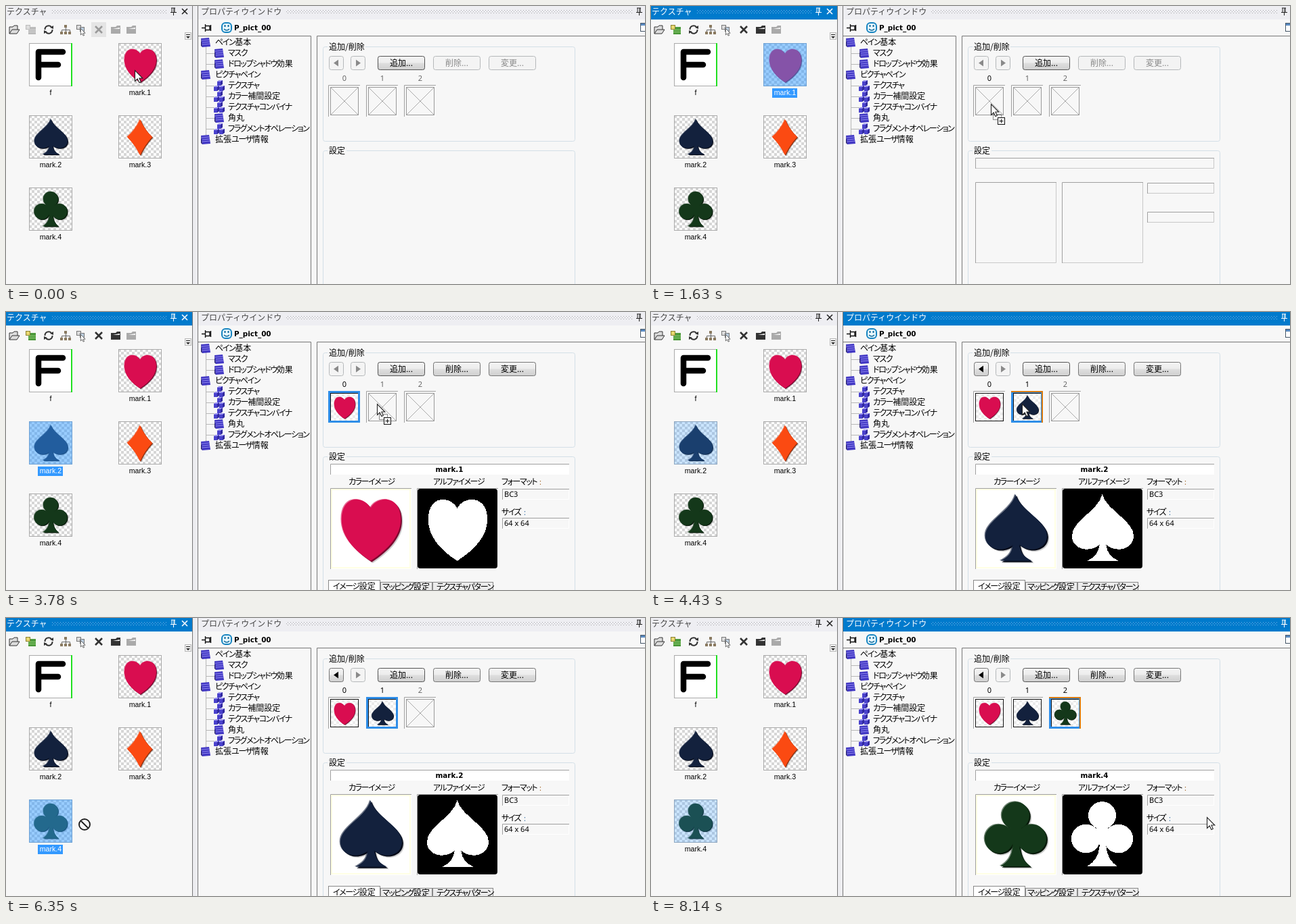
Recreate the animation shown at these times as an HTML page. Size 944 px wide and 412 px high, loop 8.21 s.

```html
<!DOCTYPE html>
<html lang="ja">
<head>
<meta charset="utf-8">
<title>Texture drag and drop</title>
<style>
  html, body { margin: 0; width: 100%; height: 100%; overflow: hidden; background: #f7f7f7; }
  svg { display: block; }
  text { font: 12px "Noto Sans CJK JP", "Noto Sans CJK", "Noto Sans", sans-serif; white-space: pre; }
  .kana { font-feature-settings: "palt"; letter-spacing: -1.4px; }
  .name { font: 10.6px "Liberation Sans", Arial, sans-serif; }
  .num { font: 11px "Noto Sans", sans-serif; }
  .bold { font: bold 10.4px "DejaVu Sans", sans-serif; }
  .mid { text-anchor: middle; }
</style>
</head>
<body>
<svg width="944" height="412" viewBox="0 0 944 412">
  <defs>
    <pattern id="checker" width="8" height="8" patternUnits="userSpaceOnUse">
      <path d="M0 0h8v8h-8z" fill="#fff"/><path d="M0 0h4v4H0zM4 4h4v4H4z" fill="#d6d6d6"/>
    </pattern>
    <pattern id="gripOff" width="4" height="4" y="6" patternUnits="userSpaceOnUse">
      <path d="M0 0h1v1H0zM2 2h1v1H2z" fill="#a9a9ad"/>
    </pattern>
    <pattern id="gripOn" width="4" height="4" y="6" patternUnits="userSpaceOnUse">
      <path d="M0 0h1v1H0zM2 2h1v1H2z" fill="#6cb8e8"/>
    </pattern>
    <linearGradient id="face" x2="0" y2="1">
      <stop offset="0" stop-color="#f4f4f4"/><stop offset=".48" stop-color="#ececec"/>
      <stop offset=".52" stop-color="#dedede"/><stop offset="1" stop-color="#d0d0d0"/>
    </linearGradient>
    <g id="book">
      <path d="M-7-6L5-7L7 6L-5 7z" fill="#4238c4"/><path d="M-7-6L-5 7L-7 5z" fill="#1d1670"/>
      <path d="M-6-3L5-4M-5 0L6-1M-5 3L6 2" stroke="#8f88ee"/>
    </g>
    <g id="cube">
      <path d="M-4-2L-1-4H4V2L1 4H-4z" fill="#3028a0"/><path d="M-4-2L-1-4H4L1-2z" fill="#9b94f2"/>
      <path d="M-4-2H1V4H-4z" fill="#4a42cc"/>
    </g>
    <g id="cubes"><use href="#cube" x="1" y="-4"/><use href="#cube" x="-4" y="4"/><use href="#cube" x="4" y="4"/></g>
    <g id="folder"><path d="M-7 6V-4H-2L0-6H5V0"/><path d="M-7 6L-3 0H8L4 6z"/></g>
    <g id="closed"><path d="M-7 6V-4H0L2-6H7V6z" stroke="none"/><path d="M-4-1L6-3V-1z" fill="#f7f7f7" stroke="none"/></g>
    <path id="pin" d="M-3-5H3M-2-5V1M1-5V1M2-5V1M-4 1.500H5M.5 2V6"/>
    <path id="arrow" d="M.5.5V16.500L4.200 13L6.800 18.500L9.300 17.400L6.900 12H11.800z" fill="#fff" stroke="#222" stroke-width="1.100"/>
  </defs>
  <g id="stage"></g>
</svg>
<script>
const LOOP = 8210, STEP = 70;
const BLUE = '#007acc', SELECT = '#3399ff', EDGE = '#a0a0a0', BACK = '#f7f7f7';

// Suit colour, shade and outline in a 64-unit square.
const suits = {
  heart: ['#d90d50', '#7c0830', 'M32 16C27 6 9 5 9 25C9 38 18 49 32 58C46 49 56 38 56 25C56 5 37 6 32 16z'],
  spade: ['#13213d', '#050a18', 'M32 5C36 18 57 26 57 38C57 49 43 52 35 45C36 52 39 55 45 58H20C26 55 29 52 30 45C22 52 8 49 8 38C8 26 29 18 32 5z'],
  diamond: ['#fb4a12', '#93310f', 'M32 6Q39 22 50 32Q39 44 32 59Q25 44 13 32Q25 22 32 6z'],
  club: ['#14381a', '#061808', 'M32 6a11 11 0 1 1 0 22a11 11 0 1 1 0-22M19 24a11.500 11.500 0 1 1 0 23a11.500 11.500 0 1 1 0-23M45 24a11.500 11.500 0 1 1 0 23a11.500 11.500 0 1 1 0-23M27 25H37L35 41C36 50 39 54 44 57.500H20C26 54 29 50 30 41z']
};

const textures = [
  { x: 34, y: 55, name: 'f' },
  { x: 166, y: 55, name: 'mark.1', suit: 'heart' },
  { x: 34, y: 162, name: 'mark.2', suit: 'spade' },
  { x: 166, y: 162, name: 'mark.3', suit: 'diamond' },
  { x: 34, y: 269, name: 'mark.4', suit: 'club' }
];

const drags = [
  { press: 520, lift: 750, drop: 1700, item: textures[1] },
  { press: 2770, lift: 3080, drop: 4010, item: textures[2] },
  { press: 6050, lift: 6280, drop: 7380, item: textures[4] }
];
const FORM_SHOWN = 1630;

// Pointer path: start, end, then a quadratic curve.
const moves = [
  [70, 140, [190, 95], [186, 95], [182, 95]],
  [750, 1170, [182, 95], [360, 145], [502, 145]],
  [1700, 2330, [502, 145], [300, 178], [107, 159]],
  [2480, 2620, [107, 159], [96, 170], [85, 181]],
  [3080, 3780, [85, 181], [330, 175], [548, 136]],
  [5120, 5820, [549, 136], [315, 290], [70, 306]],
  [6280, 7070, [70, 306], [380, 310], [624, 145]],
  [8000, 8140, [624, 145], [710, 192], [821, 295]]
];

const tree = [
  [0, 'book', 'ペイン基本'], [1, 'book', 'マスク'], [1, 'book', 'ドロップシャドウ効果'],
  [0, 'book', 'ピクチャペイン'], [1, 'cubes', 'テクスチャ'], [1, 'cubes', 'カラー補間設定'],
  [1, 'cubes', 'テクスチャコンバイナ'], [1, 'book', '角丸'], [1, 'cubes', 'フラグメントオペレーション'],
  [0, 'book', '拡張ユーザ情報']
];

const clamp = v => Math.max(0, Math.min(1, v));
const rect = (x, y, w, h, fill, extra = '') => `<rect x="${x}" y="${y}" width="${w}" height="${h}" fill="${fill}" ${extra}/>`;
const box = (x, y, w, h, fill, stroke, extra = '') =>
  rect(x + .5, y + .5, w - 1, h - 1, fill, `stroke="${stroke}" ${extra}`);
const line = (d, stroke, width = 1, extra = '') =>
  `<path d="${d}" fill="none" stroke="${stroke}" stroke-width="${width}" ${extra}/>`;
const use = (id, x, y, extra = '') => `<use href="#${id}" x="${x}" y="${y}" ${extra}/>`;
const at = (x, y, content) => `<g transform="translate(${x} ${y})">${content}</g>`;
const plain = (x, y, s, cls = '', fill = '#000') => `<text x="${x}" y="${y}" class="${cls}" fill="${fill}">${s}</text>`;
const ui = (x, y, s) => plain(x, y, s.replace(/[ァ-ヶー]+/g, '<tspan class="kana">$&</tspan>'));
const sunken = (x, y, w, h, light = '#fff') =>
  line(`M${x} ${y + h - .5}H${x + w - .5}V${y}`, light) + line(`M${x + .5} ${y + h}V${y + .5}H${x + w}`, EDGE);

function suit(name, x, y, size) {
  const [color, shade, d] = suits[name];
  return `<g transform="translate(${x} ${y}) scale(${size / 64})">
    <path d="${d}" fill="#000" opacity=".2" transform="translate(1.800 1.800)"/>
    <path d="${d}" fill="${shade}" transform="translate(1 1)"/>
    <path d="${d}" fill="${color}" opacity=".6" transform="translate(-.7 -.5)"/><path d="${d}" fill="${color}"/></g>`;
}

function titleBar(x, w, title, gripX, gripEnd, active) {
  const ink = active ? '#fff' : '#222';
  return rect(x, 0, w, 20, active ? BLUE : '#eeeef2') + plain(x + (x ? 4 : 1), 13, title, '', active ? '#fff' : '#444') +
    rect(gripX, 6, gripEnd - gripX, 5, `url(#grip${active ? 'On' : 'Off'})`) +
    use('pin', gripEnd + 10, 8, `fill="none" stroke="${ink}"`);
}

function toolbar(on) {
  const dark = '#333', faint = '#aaa';
  return use('folder', 12, 35, `stroke="${dark}" fill="#ddd"`) +
    rect(33, 31, 11, 11, on ? '#4d9a3c' : '#bcbcbc') + line('M33 35.500H44M33 38.500H44', on ? '#8ccc70' : '#d4d4d4') +
    box(29, 28, 7, 7, on ? '#e8d870' : '#ddd', on ? '#8a8030' : '#bbb') +
    line('M57.500 35A5.500 5.500 0 0 1 67 31M68.500 35A5.500 5.500 0 0 1 59 39', dark, 2) +
    `<path d="M65 32L70 29V34zM61 38L56 41V36z" fill="${dark}"/>` +
    line('M88.500 31V35M82.500 38V35.500H94.500V38M88.500 35V38', '#666') +
    [[86, 28], [80, 38], [86, 38], [92, 38]].map(p => rect(...p, 4, 4, '#8a7a60')).join('') +
    box(104, 28, 7, 7, '#ddd', '#777') + box(109, 31, 7, 7, '#bcd', '#777') +
    use('arrow', 0, 0, 'transform="translate(110 33) scale(.6)"') +
    (on ? '' : rect(126, 24, 22, 22, '#e5e5e5')) +
    line('M132 30L142 40M142 30L132 40', on ? dark : '#9a9a9a', 2.6) +
    use('closed', 162, 35, `fill="${on ? dark : faint}"`) + use('closed', 185, 35, `fill="${faint}"`) +
    box(264, 39, 10, 11, '#eee', '#bbb') + line('M266 42.500H272', '#222') + '<path d="M266 45h6l-3 3z" fill="#222"/>';
}

function tile(item, strength, focused) {
  const picture = item.suit ? suit(item.suit, 0, 0, 64) :
    line('M50 13H14V51M14 32H43', '#000', 8.5, 'stroke-linecap="round" stroke-linejoin="round"') +
    rect(62, 0, 2, 64, '#20e020');
  return at(item.x, item.y, box(0, 0, 64, 64, item.suit ? 'url(#checker)' : '#fff', '#aaa') + picture +
    (strength ? rect(0, 0, 64, 64, SELECT, `opacity="${strength}"`) : '') +
    (focused ? rect(13, 67, 37, 14, SELECT) : '') +
    plain(32, 77, item.name, 'name mid', focused ? '#fff' : '#000'));
}

function button(x, w, content, enabled, isDefault) {
  const face = (on, opacity) => `<g opacity="${opacity}" fill="${on ? '#000' : '#8a8a8a'}">` +
    box(x, 74, w, 21, on ? 'url(#face)' : '#f4f4f4', on ? (isDefault ? '#555' : '#777') : '#b5b8ba', 'rx="3"') +
    content + '</g>';
  return face(false, 1) + (enabled ? face(true, enabled) : '');
}
const textButton = (x, caption, enabled, isDefault) =>
  button(x, 70, `<text x="${x + 35}" y="89" class="mid">${caption}</text>`, enabled, isDefault);
const arrowButton = (x, way, enabled) =>
  button(x, 22, `<path d="M${x + 11 + 4 * way} 84.500l${-7 * way}-5v10z"/>`, enabled);

function slot(i, item, selected, hot, lit) {
  const frame = sunken(0, 0, 47, 47);
  let content = frame + box(3, 3, 42, 42, BACK, '#999') + line('M3 3l42 42m0-42l-42 42', '#aaa');
  if (item) {
    content = frame + box(3, 3, 42, 42, '#fff', '#111') + rect(4, 4, 40, 40, 'url(#checker)', 'opacity=".5"') +
      suit(item.suit, 3, 3, 42);
    if (selected) content += line('M1.500 1.500h44v44h-44z', '#2f8ee8', 3);
    if (selected && hot) content += line('M0 1h46v46', '#d87a10', 2);
  }
  return at(476 + 56 * i, 117, content + plain(24, -6, i, 'num mid', lit ? '#000' : '#666'));
}

function settings(item) {
  const field = (x, y, w, h) => sunken(x, y, w, h, item ? '#fff' : '#c8c8c8');
  const fields = field(479, 225, 353, 16) + field(479, 261, 120, 120) + field(607, 261, 120, 120) +
    field(733, 262, 99, 16) + field(733, 305, 99, 16);
  if (!item) return fields;
  return rect(479, 225, 353, 16, '#fff') + rect(479, 261, 120, 120, '#ffffe4') + fields +
    plain(655, 237, item.name, 'bold mid') +
    ui(506, 256, 'カラーイメージ') + ui(631, 256, 'アルファイメージ') +
    ui(732, 256, 'フォーマット') + plain(788, 256, ':', 'num', '#a06020') +
    ui(732, 301, 'サイズ') + plain(765, 301, ':', 'num', '#306aa0') +
    rect(482, 264, 114, 114, '#fff') + suit(item.suit, 479, 261, 119) +
    rect(608, 262, 118, 118, '#000', 'rx="4"') +
    `<path d="${suits[item.suit][2]}" fill="#fff" shape-rendering="crispEdges" transform="translate(607 261) scale(1.860)"/>` +
    plain(736, 274, 'BC3', 'num') + plain(736, 317, '64 x 64', 'num') +
    box(553, 400, 77, 14, '#ececec', '#888') + box(630, 400, 90, 14, '#ececec', '#888') +
    box(476, 397, 77, 18, '#fff', '#888') +
    ui(483, 411, 'イメージ設定') + ui(556, 412, 'マッピング設定') + ui(636, 412, 'テクスチャパターン');
}

const group = (y, h, title, w) =>
  box(468, y, 373, h, 'none', '#d3dfe7', 'rx="3"') + rect(475, y - 2, w, 5, BACK) + ui(477, y + 5, title);

function pointerAt(t) {
  let spot = moves[0][2];
  for (const [start, end, a, b, c] of moves) {
    if (t < start) break;
    const steps = Math.round((end - start) / STEP) + 1;
    const k = clamp((Math.floor((t - start) / STEP) + 1) / steps), e = k * k * (3 - 2 * k);
    spot = a.map((v, i) => Math.round((1 - e) ** 2 * v + 2 * e * (1 - e) * b[i] + e * e * c[i]));
  }
  return spot;
}

function pointer(t) {
  const [x, y] = pointerAt(t);
  const dragging = drags.some(d => t >= d.lift && t < d.drop);
  const overSlot = x > 475 && x < 636 && y > 116 && y < 166;
  const ring = 'M-8 0A8 8 0 1 1 8 0A8 8 0 1 1-8 0M-5.500-5.500L5.500 5.500';
  if (dragging && !overSlot) return at(x, y, line(ring, '#fff', 4) + line(ring, '#222', 2));
  const badge = box(3, 15, 13, 9, 'none', '#222', 'stroke-dasharray="1 1"') + use('arrow', 0, 0) +
    box(10, 20, 11, 11, '#fff', '#111') + line('M12.500 25.500H18.500M15.500 22.500V28.500', '#111');
  return at(x, y, dragging ? badge : use('arrow', 0, 0));
}

function leftPanel(current, active) {
  return titleBar(0, 275, 'テクスチャ', 68, 237, active) +
    line('M260 4L268 12M268 4L260 12', active ? '#fff' : '#222', 1.6) + toolbar(!!current) +
    textures.map(item => {
      const chosen = current && current.item === item;
      return tile(item, chosen ? (active ? .5 : .25) : 0, chosen && active);
    }).join('');
}

function treePanel() {
  const branches = tree.map(([depth], i) => depth ? `M295.500 ${54.5 + 16 * i}H308` : '').join('');
  return line('M295.500 60V198' + branches, '#777', 1, 'stroke-dasharray="1 1"') +
    tree.map(([depth, icon, caption], i) =>
      use(icon, 295 + 20 * depth, 54 + 16 * i) + ui(309 + 19 * depth, 58 + 16 * i, caption)).join('');
}

function rightPanel(t, active) {
  const dropped = drags.filter(d => t >= d.drop).map(d => d.item);
  const last = dropped.length - 1;
  const fade = i => clamp((t - drags[i].drop + STEP) / 420);
  return titleBar(284, 660, 'プロパティウインドウ', 413, 925, active) +
    line('M289 32.500H294M294.500 27V38M295 29.500H301V35.500H295M302.500 28V37', '#111', 1.4) +
    rect(319, 25, 14, 14, '#e8f8fe', 'rx="5" stroke="#1684c0" stroke-width="2"') +
    line('M323.500 28v3M328.500 28v3', '#126a9c', 2) + line('M322 34Q326 38 330 34', '#126a9c', 1.4) +
    plain(337, 36, 'P_pict_00', 'bold') + box(937, 25, 10, 13, '#fff', '#456') + rect(938, 26, 6, 3, '#5a8ac0') +
    line('M284 44.500H450.500V412M944 44.500H459.500V412', '#777') + treePanel() +
    group(60, 141, '追加/削除', 56) + group(214, 210, '設定', 28) +
    arrowButton(477, -1, fade(1)) + arrowButton(509, 1, 0) +
    textButton(549, '追加...', 1, true) + textButton(631, '削除...', fade(0)) + textButton(713, '変更...', fade(0)) +
    [0, 1, 2].map(i => slot(i, dropped[i], i === last, active, i <= last || (i === 0 && t >= FORM_SHOWN))).join('') +
    (t >= FORM_SHOWN ? settings(dropped[last]) : '');
}

function scene(t) {
  const current = drags.filter(d => t >= d.press).pop();
  const leftActive = !!current && t < current.drop;
  return rect(0, 0, 944, 412, BACK) + leftPanel(current, leftActive) +
    rect(275, 0, 9, 412, '#ededf0') + line('M275.500 0V412M283.500 0V412', '#777') +
    rightPanel(t, !!current && !leftActive) + pointer(t);
}

const stage = document.getElementById('stage');
let shown = '';
function tick() {
  const markup = scene(performance.now() % LOOP);
  if (markup !== shown) stage.innerHTML = shown = markup;
  requestAnimationFrame(tick);
}
tick();
</script>
</body>
</html>
```
